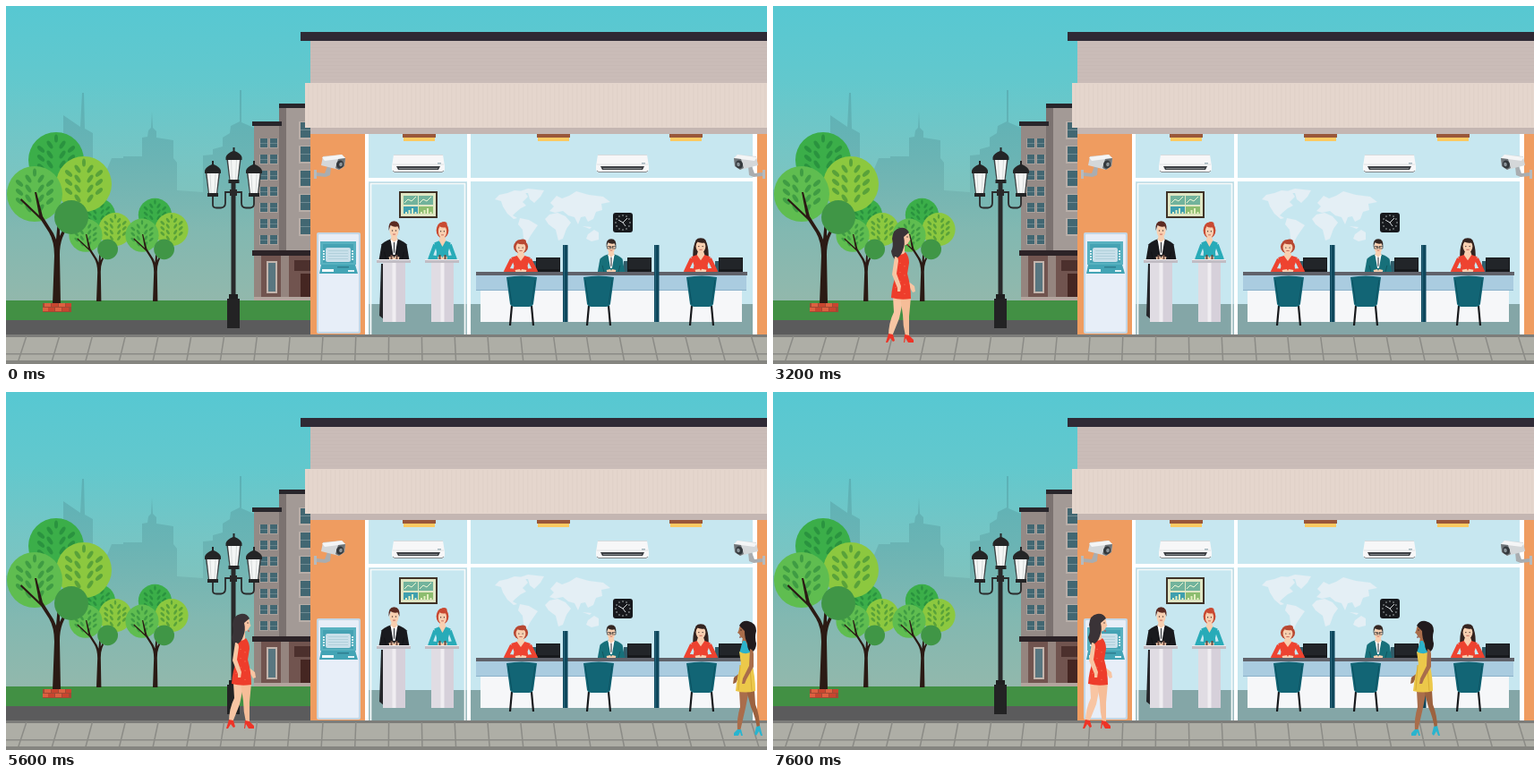
Recreate the animation shown at these times as an HTML page with a canvas. Size 850x400 px, loop 8 s.

```html
<!DOCTYPE html>
<html lang="en">
<head>
<meta charset="utf-8">
<title>Bank street</title>
<style>
html, body { margin: 0; width: 100%; height: 100%; overflow: hidden; }
canvas { display: block; }
</style>
</head>
<body>
<canvas id="stage" width="850" height="400"></canvas>
<script>
const stage = document.getElementById('stage');
const view = stage.getContext('2d');
const scene = document.createElement('canvas');
scene.width = 850;
scene.height = 400;
let g = scene.getContext('2d');

const rect = (x, y, w, h, c) => { g.fillStyle = c; g.fillRect(x, y, w, h); };
const fill = (d, c) => { g.fillStyle = c; g.fill(new Path2D(d)); };
const line = (d, c, w = 1) => { g.strokeStyle = c; g.lineWidth = w; g.stroke(new Path2D(d)); };
const oval = (x, y, rx, ry, c, turn = 0) => {
  g.fillStyle = c;
  g.beginPath();
  g.ellipse(x, y, rx, ry, turn, 0, 7);
  g.fill();
};
const round = (x, y, w, h, r, c) => {
  g.fillStyle = c;
  g.beginPath();
  g.roundRect(x, y, w, h, r);
  g.fill();
};
const fade = (x0, y0, x1, y1, ...stops) => {
  const f = g.createLinearGradient(x0, y0, x1, y1);
  stops.forEach((c, i) => f.addColorStop(i / (stops.length - 1), c));
  return f;
};
const at = (x, y, draw, sx = 1, sy = sx) => {
  g.save();
  g.translate(x, y);
  g.scale(sx, sy);
  draw();
  g.restore();
};

function sky() {
  rect(0, 0, 850, 332, fade(0, 0, 0, 332, '#57c8d2', '#62c8cd', '#76c5c4', '#86c1b8', '#90bbae'));
  fill('M0 205H64V122L83 135L85 97H87L88 137L97 142V200L113 195V182L118 170H131V168H152V147L158 146L159 139L162 136L163 118L164 136L168 140V147L187 150V170L191 175V206L220 208V167L231 166V160L242 157V147L250 142L251 134L261 129V94H263V130L277 136V332H0Z',
    fade(0, 95, 0, 330, '#5bb1b6', '#6bb4b4', '#82b8b1', '#92b8ac'));
}

function street() {
  rect(0, 329, 345, 22, '#429044');
  rect(0, 351, 345, 17, '#5b5b5c');
  rect(0, 367, 850, 33, '#aeaea6');
  rect(0, 367, 850, 3, '#7d7d7a');
  for (let x = -14; x < 860; x += 36.8) {
    line(`M${x} 369L${440 + (x - 440) * 1.022} 397`, '#8b8b86', 1.5);
  }
  rect(0, 388, 850, 1.5, '#8b8b86');
  rect(0, 396, 850, 4, '#858580');
}

function leaves(x, y) {
  const c = 'rgba(20,110,50,.42)';
  for (const s of [-1, 1]) {
    for (let i = 0; i < 4; i++) {
      oval(x + s * 7, y - 17 + i * 11, 2.3, 5, c, s * .6);
      if (i < 3) oval(x + s * 17, y - 12 + i * 10, 2.3, 5, c, s * .85);
    }
  }
  oval(x, y - 24, 2, 4.5, c);
}

function tree() {
  for (const [x, y, c] of [[-1, -161, '#3bae49'], [30, -134, '#8cc83f'], [-25, -123, '#5fbd50']]) {
    oval(x, y, 31, 31, c);
    leaves(x, y);
  }
  fill('M-5 0L-3 -54Q-3 -70 -9 -80L-18 -94L-41 -116L-40 -118L-20 -99L-25 -125H-23L-16 -98L-4 -79L-1 -72L1 -95H3L3 -76L14 -98L16 -97L6 -74Q3 -66 3 -55L4 0Z', '#2b1a14');
  oval(16, -97, 19, 19, '#409646');
}

function bricks() {
  rect(41, 332, 32, 10, '#a04a34');
  for (const [y, s] of [[332, 0], [337, -4]]) {
    for (let i = 0; i < 4; i++) {
      const x = Math.max(41, 43 + s + i * 8);
      rect(x, y, Math.min(7, 73 - x), 4, i % 2 ? '#c9452f' : '#dd6040');
    }
  }
}

function lantern() {
  fill('M-1 -19H1V-15Q8 -12 9 -8V-5H-9V-8Q-8 -12 -1 -15Z', '#242526');
  fill('M-8 -5H8L5 18H-5Z', '#3c4042');
  fill('M-6.5 -5H6.5L4 17H-4Z', '#f4f6f5');
  line('M-3 -5L-2 17M3 -5L2 17', '#c3c8c8', .6);
  rect(-6, 17, 12, 4, '#242526');
}

function lamp() {
  line('M231 212V222Q231 225.5 235 225.5H240Q245 225 245 220V208H263V220Q263 225.5 268 225.5H273Q277 225 277 221V212', '#2a2b2c', 1.8);
  rect(251.5, 196, 5, 130, '#29292a');
  rect(250, 205, 8, 7, '#29292a');
  rect(249, 322, 10, 6, '#1f1f20');
  rect(247, 327, 14, 33, '#232324');
  at(254.5, 177, lantern);
  at(231, 192, lantern);
  at(277, 192, lantern);
}

function flats() {
  rect(277, 133, 30, 195, '#948a86');
  rect(305, 113, 36, 215, '#a39a96');
  rect(305, 113, 8, 215, '#7b7270');
  rect(275, 129, 33, 5, '#28262b');
  rect(305, 109, 30, 5, '#28262b');
  for (let i = 0; i < 7; i++) {
    for (const x of [283, 294]) {
      const y = 148 + i * 18;
      rect(x, y, 10, 11, '#aaa19c');
      rect(x + 1, y, 8, 10, '#426772');
      rect(x + 1, y + 5, 8, 1, '#66838b');
    }
  }
  for (let i = 0; i < 5; i++) {
    const y = 130 + i * 27;
    rect(327, y - 1, 13, 20, '#b8aea8');
    rect(329, y, 11, 17, '#426772');
    rect(329, y + 8, 11, 1, '#6f8b93');
  }
  rect(277, 279, 63, 48, '#71544f');
  rect(277, 279, 8, 47, '#95857f');
  rect(307, 279, 9, 47, '#95857f');
  rect(275, 273, 66, 6, '#2c2327');
  rect(291, 285, 12, 36, '#c3b5ad');
  rect(293, 287, 8, 32, '#597680');
  rect(322, 284, 18, 12, '#4c302d');
  rect(329, 299, 11, 27, '#452622');
  rect(277, 325, 63, 4, '#b3a59e');
}

function shell() {
  rect(340, 135, 510, 233, '#ef9c60');
  rect(401, 143, 438, 225, '#c7e7f0');
  rect(405, 333, 430, 35, '#84a6a7');
  rect(340, 39, 510, 47, '#cabcb8');
  rect(329, 29, 521, 10, '#2f2a35');
  for (let y = 42; y < 86; y += 4) rect(340, y, 510, 1, '#c7b9b5');
  rect(340, 135, 510, 8, '#c4b6b2');
  rect(334, 86, 516, 50, '#e5d6cd');
  for (let x = 337; x < 850; x += 5) rect(x, 87, 1.5, 48, '#e1d2c9');
  for (const x of [461, 611, 759]) {
    rect(x - 18, 143, 37, 4, '#99573a');
    rect(x - 17, 147, 35, 4, '#fbca62');
  }
}

function frames() {
  rect(401, 143, 4, 225, '#fff');
  rect(515, 143, 4, 225, '#fff');
  rect(834, 143, 5, 225, '#fff');
  rect(401, 192, 438, 4, '#fff');
  line('M406 368V197.5H514V368', '#b9d3db', 1);
  line('M407.5 368V198.5H512.5V368', '#f7fafa', 1.6);
}

function cooler() {
  fill('M2 0H57L59 13V17L57 20H2L0 17V13Z', '#f7f7f8');
  line('M2 .5H57', '#cfd3d6', .8);
  line('M1 11H58', '#d8dbde', .8);
  fill('M5 13H54L52 17H7Z', '#3c3f43');
  rect(8, 15, 43, 1, '#85898c');
  line('M1 18L3 19.5H56L58 18', '#85898c', 1);
  rect(51, 9, 4, 1.5, '#a3b5bd');
}

function camera() {
  rect(0, 17, 3, 10, '#b6babd');
  fill('M3 20L12 21L15 13H19L18 23L13 25L3 24Z', '#a9adb0');
  fill('M10 2L31 0L35 4L34 13L28 17L8 12Z', '#d4d7d9');
  fill('M9 3L31 0L35 4L12 7Z', '#f4f5f6');
  fill('M27 5L35 4L34 13L28 17L24 15Z', '#6d7377');
  oval(29, 11, 4, 4.6, '#34393d', .25);
  oval(30, 11, 1.8, 2.2, '#8b9499', .25);
}

function atm() {
  round(347, 253, 49, 113, 2, '#c4d6e4');
  round(349, 255, 45, 109, 1, '#e7eef8');
  rect(351, 263, 40, 26, '#58b1c0');
  rect(354, 266, 34, 21, '#45a2b3');
  round(357, 270, 28, 16, 2, '#c9e0ea');
  for (let y = 273; y < 285; y += 3) {
    rect(360, y, 22, 1, '#b1d0db');
    rect(354, y, 2, 2, '#d9eef2');
    rect(386, y, 2, 2, '#d9eef2');
  }
  fill('M352 289H390L393 299H350Z', '#43a4b5');
  rect(353, 294, 13, 3, '#eef8fa');
  rect(370, 291, 13, 1.5, '#2e7f90');
  rect(382, 295, 7, 2, '#dff2f5');
}

function wallItems() {
  rect(439, 207, 43, 30, '#3f3227');
  rect(441, 209, 39, 26, '#dfe6c4');
  for (const x of [444, 461]) {
    rect(x, 212, 16, 10, '#72b39c');
    rect(x, 224, 16, 8, x < 450 ? '#3f9fae' : '#8dbd6f');
    line(`M${x + 1} 220L${x + 5} 216L${x + 9} 218L${x + 14} 213`, '#eef7d4', 1);
    for (let i = 0; i < 4; i++) rect(x + 2 + i * 3.5, 230 - i % 3 * 2, 2, 2 + i % 3 * 2, '#e3eec0');
  }
  fill('M546 216L551 211L560 209L568 206L579 207L583 213L577 219L581 223L575 226L569 231L566 234L571 237L567 238L560 232L555 224L553 218ZM571 208L583 204L601 206L597 213L590 220L585 216L583 209ZM574 237L584 239L594 245L589 252L585 258L581 266L578 259L577 250L572 244Z', '#e4eff5');
  fill('M608 220L615 212L621 215L629 212L637 207L651 211L667 213L675 219L665 221L666 228L659 230L656 238L650 241L647 235L642 236L639 244L635 236L628 234L622 229L613 231L607 229L612 224ZM607 233L616 231L625 235L631 242L626 249L622 260L617 262L614 250L606 244L602 238ZM650 255L657 250L662 253L662 261L654 263L648 260ZM644 246L654 247L652 249Z', '#e4eff5');
  round(678, 231, 22, 22, 3, '#17191d');
  for (let i = 0; i < 12; i++) {
    const a = i * Math.PI / 6;
    oval(689 + Math.sin(a) * 8, 242 - Math.cos(a) * 8, .7, .7, '#cfd4d6');
  }
  line('M684 239L689 242L694 237M689 242L692 246', '#d5dadc', 1);
}

// Upper body, standing on the line y = 0.
function clerk(top, hair, kind) {
  const skin = '#f8cfb0', man = kind === 'man';
  if (kind === 'long') fill('M-8 -14Q-9 -36 0 -36Q9 -36 8 -14L4 -17H-4Z', hair);
  if (kind === 'short') {
    oval(0, -29, 7.5, 7.5, hair);
    oval(2, -35, 3.5, 2.5, hair);
  }
  if (man) {
    fill('M-17 0L-14 -15Q-11 -18 -4 -20H4Q11 -18 14 -15L17 0Z', top);
  } else {
    fill('M-8 0L-7 -8L-10 -17L-4 -19H4L10 -17L7 -8L8 0Z', top);
    line('M-9 -15L-14.5 -3L-6 -2M9 -15L14.5 -3L6 -2', top, 4.5);
  }
  fill('M-4 -19L-2.5 -24H2.5L4 -19L0 -13Z', skin);
  if (man) {
    fill('M-4 -20L0 -17L4 -20L1 -5H-1Z', '#fff');
    line('M0 -17V-7', '#33363b', 1.2);
    line('M-11 -8L-9 -1M11 -8L9 -1', 'rgba(0,0,0,.3)', .8);
  }
  oval(0, -28, 5, 6.5, skin);
  fill('M-6 -28Q-7 -37 0 -37Q7 -37 6 -28L4 -32Q0 -31 -4 -33Z', hair);
  oval(-2, -28, .7, .6, '#46332e');
  oval(2, -28, .7, .6, '#46332e');
  line('M-1.5 -24.5H1.5', '#c05a50', .8);
  fill('M-6 -3L-1 -4L0 -2L1 -4L6 -3L5 0H-5Z', skin);
}

function podium(x, w) {
  const left = x - w / 2;
  rect(left, 287, w, 66, '#d6d0da');
  rect(left, 287, w / 2, 66, '#e0dce3');
  rect(x - 2, 287, 4, 66, '#f0edf1');
  rect(left - 7, 283, w + 13, 4, '#c1bdc4');
  rect(left - 7, 283, w + 13, 1, '#edebee');
  rect(x - 4, 278, 2, 5, '#6b4a40');
  rect(x + 2, 278, 2, 5, '#6b4a40');
}

function reception() {
  at(433.5, 284, () => clerk('#191a1e', '#5c2b22', 'man'), 1, 1.18);
  at(487.5, 284, () => clerk('#28abb8', '#c94a32', 'short'), .92, 1.15);
  fill('M419 288H422V350L417 346Z', '#25262a');
  podium(433.5, 25);
  podium(487.5, 25);
}

function chair() {
  line('M-11 33L-13 55M11 33L13 55', '#17191c', 2.2);
  fill('M-17 1Q0 -2 17 1L13 31Q12 34 8 34H-8Q-12 34 -13 31Z', '#126575');
  line('M-15 4L-11 31M15 4L11 31', '#0c5262', 1);
}

function monitor(x) {
  rect(x, 281, 27, 16, '#17191c');
  rect(x + 1, 282, 25, 12, '#222529');
  rect(x - 4, 285, 4, 12, '#315d6a');
}

function counter() {
  for (const x of [592, 694, 796]) monitor(x);
  at(575, 298, () => clerk('#ee4330', '#b84832', 'short'), 1.08, 1);
  at(676, 298, () => clerk('#17707a', '#342723', 'man'), .9, 1.02);
  line('M671.5 268.5H675.5V271H671.5ZM677 268.5H681V271H677Z', '#3d3d3d', .7);
  at(776, 298, () => clerk('#ee4330', '#34231f', 'long'), 1.08, 1.05);
  rect(525, 297, 303, 4, '#60626a');
  rect(525, 301, 302, 17, '#aacce0');
  rect(525, 317, 302, 1, '#8bb2ca');
  rect(530, 318, 292, 35, '#f6f7f9');
  for (const x of [622, 724]) {
    rect(x, 267, 5.5, 86, '#0e475c');
    rect(x + 1, 267, 1, 86, '#28657a');
  }
  for (const x of [576, 662, 777]) at(x, 302, chair);
}

function walkerRed() {
  const skin = '#f8c5a3', dark = '#3a3337';
  fill('M5 306L14 313L15 319L12 320L9 315L3 309Z', skin);
  fill('M-10 325L-9 342Q-15 354 -15 369H-11L-3 349L2 325Z', skin);
  fill('M-2 325L1 345Q1 357 4 369H8L8 347L10 325Z', '#f6bd98');
  fill('M-15 366L-10 367L-8 374L-10 375L-13 371L-16 376H-18Z', '#ee3427');
  fill('M3 367L8 368L13 373V376H7L4 371L3 376H2Z', '#ee3427');
  fill('M-5 266H3V278H-5Z', skin);
  fill('M-6 276Q0 280 4 275Q8 280 8 287L6 299Q10 313 10 327Q-1 329 -12 326Q-11 311 -6 299L-8 286Z', '#ee3d2b');
  for (let i = 0; i < 12; i++) oval(-7 + i * 5 % 15, 284 + i * 3.4, .7, .7, '#f86c50');
  oval(3, 259, 5.5, 8.5, skin);
  fill('M7 257L9.5 261L7 264Z', skin);
  fill('M8 253Q5 247 -2 248Q-10 249 -11 260Q-9 268 -12 274Q-11 280 -8 283Q-1 280 1 273Q4 266 2 258Z', dark);
  line('M6 267H8', '#d43e35', 1);
  oval(6, 258, .7, .7, '#34292a');
  fill('M-8 280Q-4 280 -4 285L-6 299L-1 313L-2 319L-5 319L-5 315L-11 300Z', skin);
}

function walkerYellow() {
  const skin = '#a96d4b', dark = '#211b1d';
  fill('M-7 313L-15 319L-16 326L-13 325L-10 320L-5 317Z', '#99603f');
  fill('M-9 333L-8 352Q-12 364 -11 379H-8L-2 353L2 333Z', skin);
  fill('M-1 333L4 352Q9 363 11 376H14Q14 361 9 349L8 333Z', '#9c623f');
  fill('M-7 377L-11 377L-15 381V384H-10L-8 380L-7 384H-5Z', '#2ab4ce');
  fill('M14 373L10 374L8 382L10 384L13 379L15 384H17Z', '#2ab4ce');
  fill('M-5 273H4V296H-8Z', skin);
  fill('M-5 278L-2 278L4 292H-9Z', '#2cb2ca');
  fill('M-9 290Q0 295 6 289L5 302Q9 318 9 334Q-2 337 -13 334Q-11 315 -7 304Z', '#ecc84a');
  line('M-8 305L-10 333M3 307L5 334', '#d7ad34', 1);
  oval(-4, 267, 5.5, 8.5, skin);
  fill('M-8 264L-11 269L-8 271Z', skin);
  fill('M-9 261Q-6 255 1 256Q10 258 10 267Q8 274 10 281Q10 288 5 291Q0 289 0 281Q-3 275 -3 267Z', dark);
  line('M-9 274H-7', '#7b302d', 1);
  oval(-7, 266, .7, .7, '#1d1717');
  fill('M3 287Q7 288 7 293L7 307L-1 321L-3 326L-6 326L-5 320L2 306Z', skin);
}

sky();
flats();
street();
at(104, 330, tree, .6);
at(167, 330, tree, .6);
at(57, 333, tree);
bricks();
lamp();
shell();
wallItems();
at(431, 166, cooler);
at(659, 166, cooler);
reception();
counter();
frames();
at(344, 166, camera);
at(848, 166, camera, -1, 1);
atm();
rect(340, 367, 510, 2, '#7d7d7a');

g = view;
const STEP = 400, LOOP = 8000;

function play() {
  const step = Math.floor(performance.now() % LOOP / STEP);
  g.drawImage(scene, 0, 0);
  if (step > 0) at(step * 20 - 16, 0, walkerRed);
  if (step > 12) at(1108 - step * 20, 0, walkerYellow);
  requestAnimationFrame(play);
}
play();
</script>
</body>
</html>
```
